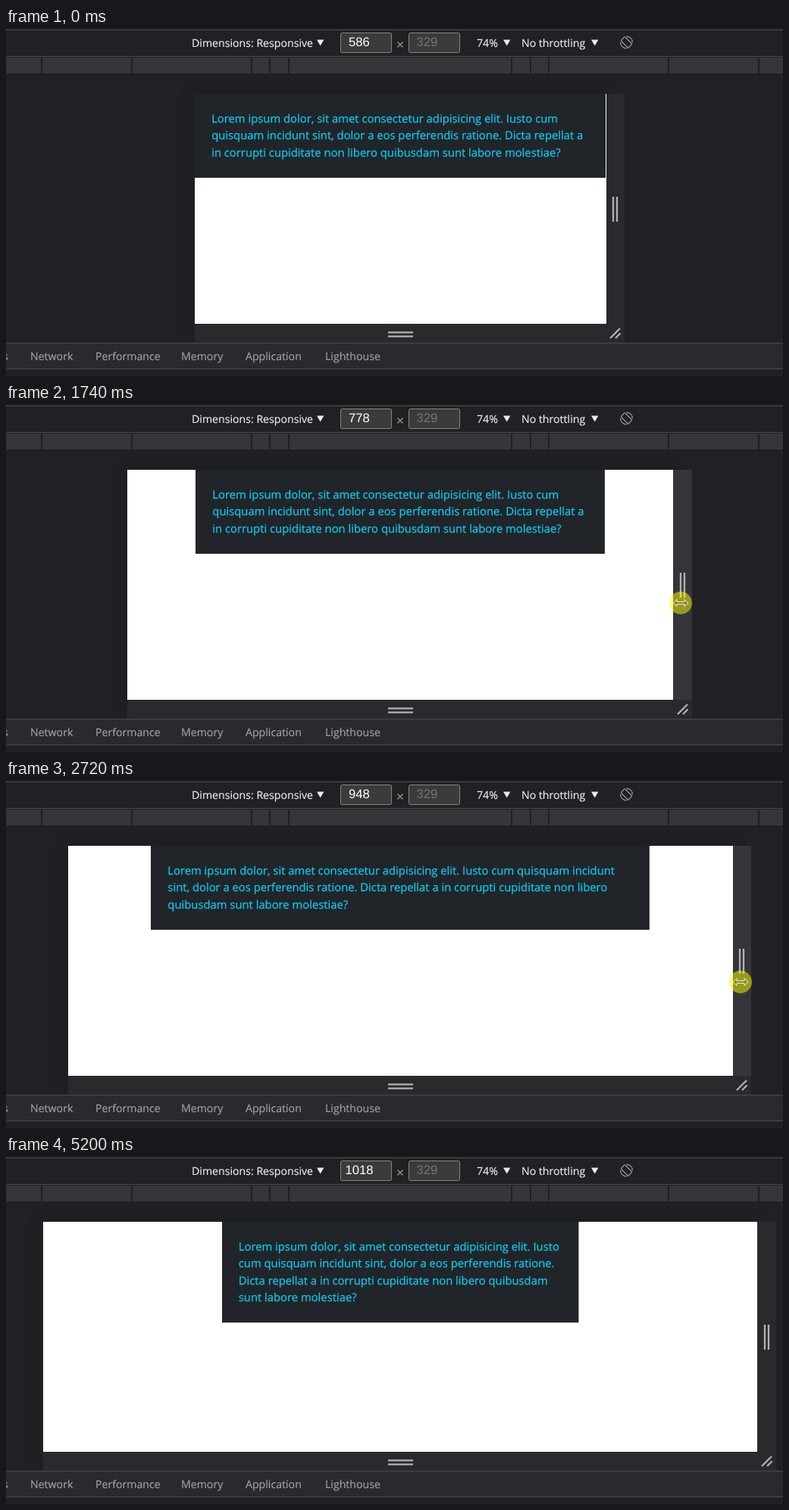
An HTML page that plays this animation: 1025x460 px, repeating every 5.7 s.

```html
<!DOCTYPE html>
<html lang="en">
<head>
<meta charset="utf-8">
<title>Responsive column demo</title>
<style>
  html, body { margin: 0; width: 100%; height: 100%; overflow: hidden; background: #202124; }
  svg { position: absolute; left: 0; top: 0; display: block; }
  text, p { text-rendering: geometricPrecision; }
  .ui { font: 14.15px "Open Sans", "Noto Sans", sans-serif; fill: #e8eaed; stroke: #e8eaed; stroke-width: .2; }
  .tab { fill: #9aa0a6; stroke: #9aa0a6; }
  .num { font: 16.67px "Liberation Sans", Arial, sans-serif; text-anchor: middle; fill: #fff; }
  .off { fill: #757575; }
  .crisp { shape-rendering: crispEdges; }
  p {
    position: absolute; left: 0; top: 87px; margin: 0; box-sizing: border-box;
    padding: 22.2px; color: #0dcaf0; -webkit-text-stroke: .25px #0dcaf0;
    font: 14.8px/22.2px "Open Sans", "Noto Sans", sans-serif;
  }
</style>
</head>
<body>
<svg width="1025" height="460" viewBox="0 0 1025 460">
  <defs>
    <filter id="soft" x="-20%" y="-30%" width="140%" height="160%"><feGaussianBlur stdDeviation="12"/></filter>
    <path id="down" d="M0 15.5h9.4l-4.7 8z" fill="#e8eaed"/>
  </defs>
  <rect width="1025" height="460" fill="#202124"/>
  <rect id="shadow" y="87" height="329" opacity=".12" filter="url(#soft)"/>

  <g class="crisp">
    <path d="M0 2.5h1025M0 37.5h1025" stroke="#494c50"/>
    <rect y="39" width="1025" height="21" fill="#35363a"/>
    <g id="ticks" fill="#202124"></g>
  </g>

  <text class="ui" x="245" y="25">Dimensions: Responsive</text>
  <text class="ui" x="621" y="25">74%</text>
  <text class="ui" x="680" y="25">No throttling</text>
  <use href="#down" x="410"/>
  <use href="#down" x="656"/>
  <use href="#down" x="772"/>
  <g fill="#3b3b3b" stroke="#858585">
    <rect x="441.5" y="6.5" width="67" height="26" rx="2"/>
    <rect x="531.5" y="6.5" width="67" height="26" rx="2"/>
  </g>
  <text class="num" id="size" x="466" y="24">586</text>
  <text class="num off" x="555.5" y="24">329</text>
  <g fill="none" stroke="#9199a0" stroke-width="1.3">
    <path d="M516.5 18.5l7 7m0-7l-7 7"/>
    <rect x="814.8" y="12.2" width="7.4" height="13.6" rx="1" transform="rotate(-45 818.5 19)"/>
    <path d="M818.5 11a8 8 0 0 1 8 8M818.5 27a8 8 0 0 1 -8 -8"/>
  </g>

  <g class="crisp">
    <rect id="bottom" y="391" height="25" fill="#292a2d"/>
    <rect id="side" y="87" width="25" height="304"/>
    <rect id="page" y="87" height="304" fill="#fff"/>
  </g>
  <rect id="card" y="87" fill="#212529"/>
  <g stroke="#b0b2b4" stroke-width="2.3" fill="none">
    <path d="M504 402.3h33m-33 5.4h33"/>
    <path id="grip" d="M10 223v33m5-33v33M6 410l13-13M13 410l6.5-6.5"/>
  </g>

  <g class="crisp">
    <rect y="416" width="1025" height="34" fill="#292a2d"/>
    <rect y="451" width="1025" height="9" fill="#202124"/>
    <path d="M0 416.5h1025M0 450.5h1025" stroke="#494c50"/>
  </g>
  <g id="tabs"></g>

  <g id="cursor">
    <circle r="15" fill="#ff0" fill-opacity=".5"/>
    <path id="resize" d="M-10 0l5-4.5v3h10v-3l5 4.5l-5 4.5v-3h-10v3z" fill="#84841a" stroke="#fff" stroke-width=".9"/>
    <path id="arrow" d="M0 0v16l3.7-3.5l2.4 5.6l2.5-1.1l-2.4-5.4h5.1z" fill="#fff" stroke="#000"/>
  </g>
</svg>
<p id="copy">Lorem ipsum dolor, sit amet consectetur adipisicing elit. Iusto cum quisquam incidunt sint, dolor a eos perferendis ratione. Dicta repellat a in corrupti cupiditate non libero quibusdam sunt labore molestiae?</p>

<script>
const LOOP = 5700, CENTER = 520, HALF_ZOOM = 0.925 / 2;
const MIN = 586, MAX = 1018;
const DRAG = { start: 850, end: 4530 };
const $ = id => document.getElementById(id);
const set = (id, attrs) => {
  for (const key in attrs) $(id).setAttribute(key, attrs[key]);
};
const show = (id, on) => set(id, { display: on ? 'inline' : 'none' });
const mix = (a, b, k) => a + (b - a) * k;
const progress = (t, from, to) => Math.min(1, Math.max(0, (t - from) / (to - from)));

// Pace of the hand: time and viewport width
const pace = [
  [DRAG.start, MIN], [1030, 618], [1450, 713], [2040, 845], [2720, 948],
  [3110, 994], [3390, 1008], [4410, 1008], [DRAG.end, MAX]
];

function widthAt(t) {
  let width = MIN;
  for (let i = 1; i < pace.length; i++) {
    const [t0, w0] = pace[i - 1], [t1, w1] = pace[i];
    if (t >= t0) width = mix(w0, w1, progress(t, t0, t1));
  }
  return Math.round(width);
}

function cursorAt(t, width) {
  const onGrip = {
    x: CENTER + width * HALF_ZOOM + 10.5,
    y: 256 + 13 * ((width - MIN) / (MAX - MIN)) ** 0.7
  };
  if (t >= 110 && t < 620) {
    const k = 1 - (1 - progress(t, 110, 620)) ** 2;
    return { x: mix(937, 806, k), y: mix(470, 267, k), arrow: true };
  }
  if (t >= 690 && t < 4950) return onGrip;
  if (t >= 4950 && t < 5200) {
    const k = progress(t, 4950, 5200) ** 1.5;
    return { x: mix(onGrip.x, 1012, k), y: mix(onGrip.y, 476, k), arrow: true };
  }
  return null;
}

function draw(t) {
  const width = widthAt(t), half = width * HALF_ZOOM;
  const left = Math.round(CENTER - half), right = Math.round(CENTER + half);
  const dragging = t >= DRAG.start && t < DRAG.end;

  $('size').textContent = width;
  set('shadow', { x: left, width: right - left });
  set('bottom', { x: left, width: right + 25 - left });
  set('side', { x: right, fill: dragging ? '#35363a' : '#292a2d' });
  set('page', { x: left, width: Math.ceil(CENTER + half) - left });
  set('grip', { transform: `translate(${right})` });

  // Column share at the page's breakpoints
  const share = width >= 992 ? 0.5 : width >= 768 ? 0.75 : 1;
  const cardHalf = half * share, cardLeft = Math.round(CENTER - cardHalf);
  const copy = $('copy');
  copy.style.left = CENTER - cardHalf + 'px';
  copy.style.width = cardHalf * 2 + 'px';
  set('card', {
    x: cardLeft,
    width: CENTER + cardHalf - cardLeft,
    height: copy.getBoundingClientRect().height
  });

  const cursor = cursorAt(t, width);
  show('cursor', cursor);
  if (!cursor) return;
  set('cursor', { transform: `translate(${Math.round(cursor.x)} ${Math.round(cursor.y)})` });
  show('arrow', cursor.arrow);
  show('resize', !cursor.arrow);
}

// Ruler marks stand at common device widths, mirrored around the centre
const tick = x => `<rect x="${Math.round(x)}" y="39" width="2" height="21"/>`;
$('ticks').innerHTML = [320, 375, 425, 768, 1024].map(device => {
  const reach = device * HALF_ZOOM;
  return tick(CENTER - reach) + tick(CENTER + reach - 2);
}).join('');

const tabs = { s: -4, Network: 32, Performance: 118, Memory: 231, Application: 316, Lighthouse: 421 };
$('tabs').innerHTML = Object.entries(tabs)
  .map(([label, x]) => `<text class="ui tab" x="${x}" y="439">${label}</text>`).join('');

const start = performance.now();
function frame() {
  draw((performance.now() - start) % LOOP);
  requestAnimationFrame(frame);
}
frame();
</script>
</body>
</html>
```
